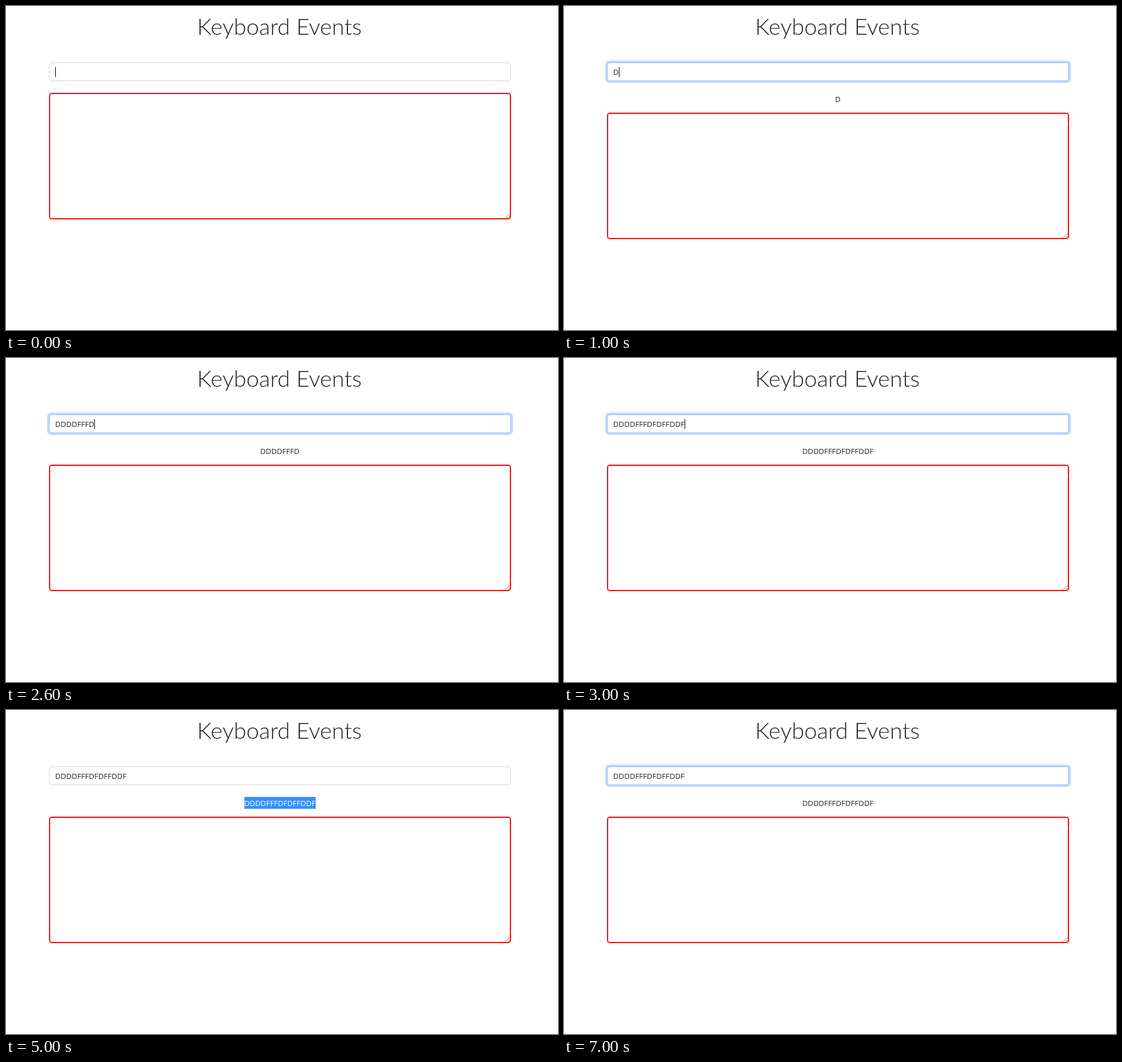
These frames come from a looping animation (975 by 574 pixels, 8 s). An HTML page:

```html
<!DOCTYPE html>
<html lang="en">
<head>
<meta charset="utf-8">
<title>Keyboard Events</title>
<style>
  html, body { margin: 0; width: 100%; height: 100%; overflow: hidden; background: #fff; }
  svg { display: block; width: 975px; height: 574px; }
  text { font: 13.35px "Open Sans", "Noto Sans", sans-serif; fill: #212529; }
  #title { font: 300 39px Lato, "Open Sans", sans-serif; }
  #echo { text-anchor: middle; }
  #picked { fill: #fff; }
  .box { fill: none; }
</style>
</head>
<body>
<svg viewBox="0 0 975 574">
  <text id="title" x="483" y="51" text-anchor="middle">Keyboard Events</text>

  <rect id="glow" x="72.5" y="96.5" width="823" height="40" rx="8" fill="#c2dbfe"/>
  <rect id="field" x="76.5" y="100.5" width="815" height="32" rx="4.5" fill="#fff"/>
  <text id="typed" x="86.8" y="122"></text>
  <path id="caret" stroke="#000"/>

  <rect id="mark" y="154" height="21" fill="#3390ff"/>
  <text id="echo" x="483.7" y="170"><tspan id="plain"></tspan><tspan id="picked"></tspan></text>

  <g id="area">
    <rect class="box" x="77" y="155" width="814" height="222" rx="4" stroke="#f00" stroke-width="2"/>
    <path class="box" d="M882 375.5L889.5 368M886.5 375.5L889.5 372.5" stroke="#666"/>
  </g>
</svg>
<script>
const $ = id => document.getElementById(id);
const FULL = "DDDDFFFDFDFFDDF", N = FULL.length;
const IDLE = "#ced4da", FADING = "#c6d6ec", FOCUS = "#86b7fe";

// One state per second: typed letters, field border, caret shown, start of selection
const states = [
  [0, FADING, true, 0],
  [1, FOCUS, true, 1],
  [8, FOCUS, true, 8],
  [N, FOCUS, true, N],
  [N, IDLE, false, 5],
  [N, IDLE, false, 0],
  [N, IDLE, false, 0],
  [N, FOCUS, false, N]
];

function fitTitle() {
  const title = $("title");
  title.style.fontSize = 39 * 291 / title.getComputedTextLength() + "px";
}

function draw(second) {
  const [count, border, caret, from] = states[second];
  const text = FULL.slice(0, count);

  $("field").setAttribute("stroke", border);
  $("glow").style.display = border === FOCUS ? "" : "none";

  $("typed").textContent = text;
  const width = count ? $("typed").getComputedTextLength() : 0;
  const x = Math.floor(87.4 + width) + 0.5;
  $("caret").setAttribute("d", caret ? `M${x} 108V126` : "");

  $("plain").textContent = text.slice(0, from);
  $("picked").textContent = text.slice(from);
  const before = from ? $("plain").getComputedTextLength() : 0;
  const left = Math.round(483.7 - width / 2 + before);
  $("mark").setAttribute("x", left);
  $("mark").setAttribute("width", from < count ? 547 - left : 0);

  $("area").setAttribute("transform", `translate(0 ${count ? 35 : 0})`);
}

let shown = -1;
const start = performance.now();
function tick(now) {
  const second = Math.floor(Math.max(0, now - start) / 1000) % states.length;
  if (second !== shown) draw(shown = second);
  requestAnimationFrame(tick);
}
fitTitle();
draw(shown = 0);
requestAnimationFrame(tick);
</script>
</body>
</html>
```
